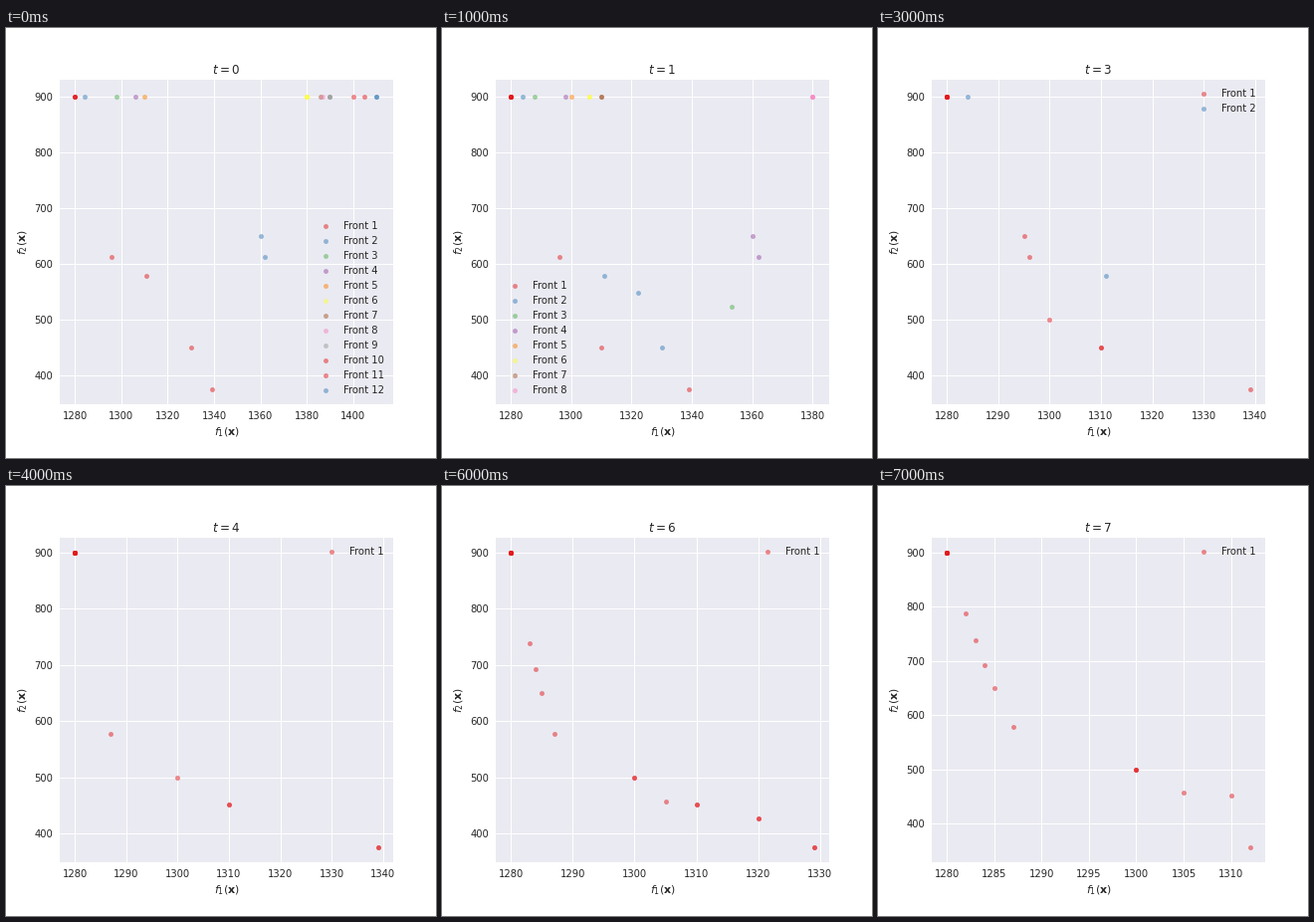
Animation, 432 px wide and 432 px high, one loop 8 s. Source, as a matplotlib script:

```python
import matplotlib.pyplot as plt
from matplotlib.animation import FuncAnimation
from matplotlib.ticker import MultipleLocator

INK = "0.15"
plt.rcParams.update({
    "font.family": "DejaVu Sans",
    "font.size": 10,
    "mathtext.fontset": "dejavusans",
    "text.color": INK,
    "axes.labelcolor": INK,
    "axes.labelsize": 11,
    "axes.titlesize": 12,
    "axes.facecolor": "#EAEAF2",
    "axes.edgecolor": "white",
    "axes.linewidth": 0,
    "axes.axisbelow": True,
    "axes.grid": True,
    "grid.color": "white",
    "grid.linewidth": 1,
    "grid.linestyle": "-",
    "legend.frameon": False,
    "legend.scatterpoints": 1,
})
for axis in ("xtick", "ytick"):
    plt.rcParams.update({
        f"{axis}.color": INK,
        f"{axis}.major.size": 0,
        f"{axis}.major.pad": 7,
    })

RED, BLUE = "#e41a1c", "#377eb8"
COLORS = [RED, BLUE, "#4daf4a", "#984ea3", "#ff7f00", "#ffff33",
          "#a65628", "#f781bf", "#999999", RED, RED, BLUE]

# Second objective of every solution below the ceiling
CEILING = 900
COST = {1282: 787, 1283: 738, 1284: 692, 1285: 650, 1287: 578, 1295: 650,
        1296: 612, 1300: 500, 1305: 457, 1310: 451, 1311: 578, 1312: 356,
        1320: 426, 1322: 548, 1329: 375, 1330: 451, 1339: 375, 1353: 523,
        1356: 548, 1358: 548, 1360: 650, 1362: 612}


def front(top=(), low=()):
    """Points of one front: some on the ceiling, some below it."""
    return [(x, CEILING) for x in top] + [(x, COST[x]) for x in low]


def generation(fronts, x_max, y_range=(375, 900), step=10, loc="upper right"):
    return dict(fronts=fronts, x_range=(1280, x_max), y_range=y_range,
                step=step, loc=loc)


TALL = (375, 904.4)

GENERATIONS = [
    generation([
        front([1280] * 4, [1296, 1311, 1330, 1339]),
        front([1284], [1360, 1362]),
        front([1298]),
        front([1306]),
        front([1310]),
        front([1380] * 3),
        front([1386]),
        front([1387]),
        front([1390] * 3),
        front([1400]),
        front([1405]),
        front([1410] * 2),
    ], 1410.7, TALL, 20, "lower right"),
    generation([
        front([1280] * 9, [1296, 1310, 1339]),
        front([1284], [1311, 1322, 1330]),
        front([1288], [1353]),
        front([1298], [1360, 1362]),
        front([1300]),
        front([1306] * 2),
        front([1310] * 2),
        front([1380] * 3),
    ], 1380.4, TALL, 20, "lower left"),
    generation([
        front([1280] * 10, [1295, 1296, 1300, 1310, 1310, 1339]),
        front([1284] * 2, [1311, 1311, 1311, 1322, 1330]),
        front([1288], [1353, 1353]),
        front([1290], [1356]),
        front([1294], [1358]),
    ], 1358.5, TALL),
    generation([
        front([1280] * 12, [1295, 1296, 1300, 1310, 1310, 1339]),
        front([1284], [1311]),
    ], 1339, TALL),
    generation([front([1280] * 14, [1287, 1300, 1310, 1310, 1339, 1339])],
               1339),
    generation([front([1280] * 13, [1283, 1285, 1287, 1300, 1310, 1310,
                                    1320, 1329])], 1329),
    generation([front([1280] * 14, [1283, 1284, 1285, 1287, 1300, 1300, 1305,
                                    1310, 1310, 1320, 1320, 1329, 1329])],
               1329),
    generation([front([1280] * 14, [1282, 1283, 1284, 1285, 1287, 1300, 1300,
                                    1300, 1305, 1310, 1312])],
               1312, (356, 900), 5),
]

fig = plt.figure(figsize=(6, 6), dpi=72, facecolor="white")
ax = fig.add_axes([0.125, 0.125, 0.775, 0.755])


def padded(lo, hi, margin=0.05):
    pad = margin * (hi - lo)
    return lo - pad, hi + pad


def draw(t):
    gen = GENERATIONS[t]
    ax.clear()
    for i, points in enumerate(gen["fronts"]):
        xs, ys = zip(*points)
        ax.scatter(xs, ys, s=20, color=COLORS[i], alpha=0.5, linewidths=0.3,
                   label=f"Front {i + 1}")
    ax.set_xlim(padded(*gen["x_range"]))
    ax.set_ylim(padded(*gen["y_range"]))
    ax.xaxis.set_major_locator(MultipleLocator(gen["step"]))
    ax.yaxis.set_major_locator(MultipleLocator(100))
    ax.set_xlabel(r"$f_1(\mathbf{x})$")
    ax.set_ylabel(r"$f_2(\mathbf{x})$")
    ax.set_title(f"$t = {t}$")
    ax.legend(loc=gen["loc"])
    return []


anim = FuncAnimation(fig, draw, frames=len(GENERATIONS), interval=1000,
                     init_func=lambda: [], repeat=True, repeat_delay=0)
plt.show()
```
